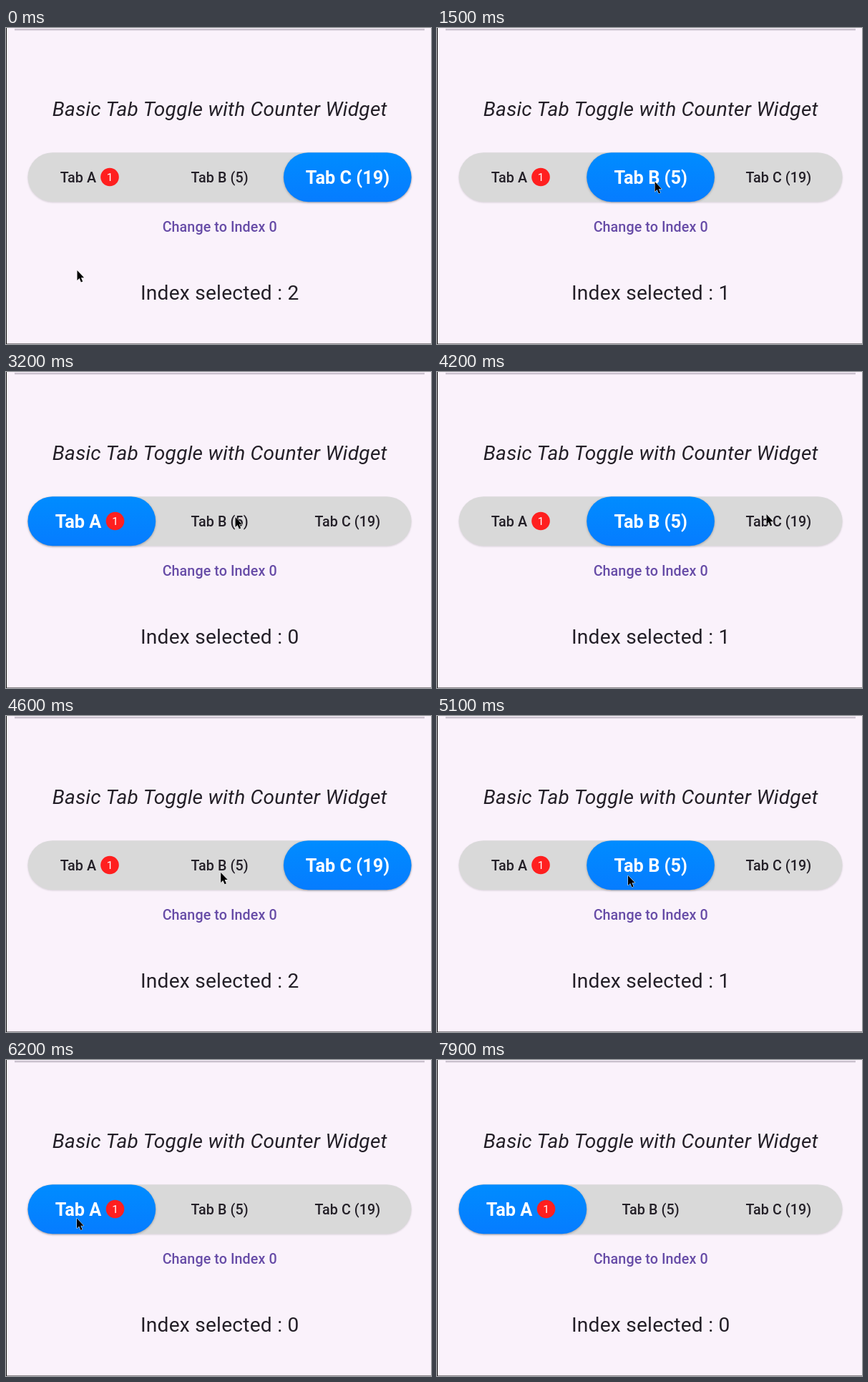
These frames come from a looping animation (594x442 px, 8 s). An HTML page:

```html
<!DOCTYPE html>
<html lang="en">
<head>
<meta charset="utf-8">
<title>Tab toggle</title>
<style>
  html, body { margin: 0; width: 100%; height: 100%; overflow: hidden; background: #faf2fb; }
  svg { display: block; width: 594px; height: 442px; }
  text { font-family: Roboto, sans-serif; fill: #231f27; text-anchor: middle; }
  .title, .index { font-size: 28.1px; letter-spacing: .25px; }
  .title { font-style: italic; }
  .button, .label { font-size: 19.7px; font-weight: 500; letter-spacing: .09px; }
  .button { fill: #674ca7; }
  .label.on { font-size: 25.3px; font-weight: 700; letter-spacing: 0; fill: #fff; }
  .label.start { text-anchor: start; }
  .count { font-size: 15.5px; fill: #fff; }
  #track { filter: drop-shadow(0 1px 1px rgba(0, 0, 0, .14)); }
  #pill { filter: drop-shadow(0 1.5px 1.5px rgba(0, 0, 0, .28)); }
</style>
</head>
<body>
<svg viewBox="0 0 594 442">
  <defs>
    <linearGradient id="blue" x1="0" y1="0" x2="0" y2="1">
      <stop offset="0" stop-color="#008cff"/>
      <stop offset="1" stop-color="#067cff"/>
    </linearGradient>
  </defs>
  <rect width="594" height="442" fill="#faf2fb"/>
  <rect x="12" y="1" width="573" height="2.4" fill="#cac1ce"/>
  <rect y="441" width="594" height="1" fill="#8c878b"/>
  <rect width="1" height="442" fill="#111"/>

  <text class="title" x="298.8" y="122.7">Basic Tab Toggle with Counter Widget</text>
  <rect id="track" x="30.5" y="174.2" width="536.1" height="69" rx="34.5" fill="#d9d9d9"/>
  <rect id="pill" y="174.2" width="178.7" height="69" rx="34.5" fill="url(#blue)"/>
  <text class="label start">Tab A</text>
  <text class="label" x="298.7">Tab B (5)</text>
  <text class="label" x="477.5">Tab C (19)</text>
  <g id="badge">
    <circle r="12.8" fill="#ff1f1f"/>
    <text class="count" y="5.6">1</text>
  </g>
  <text class="button" x="298.7" y="284.6">Change to Index 0</text>
  <text class="index" id="index" x="298.7" y="379.8"></text>
  <path id="cursor" d="M0 0V14L3.1 11L5.4 16.4L7.7 15.4L5.4 10.2H9.6Z"
        fill="#000" stroke="#fff" stroke-width="1" stroke-linejoin="round" paint-order="stroke"/>
</svg>
<script>
  const LOOP = 8000, STEP = 100, SLIDE = 300, CURSOR_END = 7200;
  const TAB_X = 30.5, TAB_W = 178.7;

  // [time, selected tab]
  const picks = [[0, 2], [1100, 1], [2200, 0], [3260, 1], [4260, 2], [4700, 1], [5800, 0]];

  // [time, x, y] where the cursor comes to rest
  const stops = [
    [0, 99.5, 339], [300, 6, 378], [1000, 190, 108], [1500, 304.5, 215],
    [2000, 496, 150], [2500, 100, 212], [2800, 150, 113], [3200, 320.5, 203],
    [4200, 460.5, 199], [5100, 267, 223], [5400, 436, 225], [6200, 99, 221.5],
    [6900, 362, 267]
  ];

  const $ = id => document.getElementById(id);
  const pill = $('pill'), badge = $('badge'), index = $('index'), cursor = $('cursor');
  const labels = [...document.querySelectorAll('.label')];

  const mix = (a, b, p) => a + (b - a) * p;
  const easeInOut = p => p * p * (3 - 2 * p);
  const easeOut = p => 1 - (1 - p) ** 3;
  const place = (el, x, y) => el.setAttribute('transform', `translate(${x} ${y})`);

  // Latest entry begun by time t, and the one next to it
  const lastBegun = (list, t) => list.filter(k => k[0] <= t).length - 1;

  function drawTabs(t) {
    const n = lastBegun(picks, t);
    const [start, tab] = picks[n];
    const from = picks[Math.max(0, n - 1)][1];
    const p = easeInOut(Math.min(1, (t - start) / SLIDE));

    pill.setAttribute('x', TAB_X + TAB_W * mix(from, tab, p));
    labels.forEach((el, i) => {
      el.classList.toggle('on', i === tab);
      el.setAttribute('y', i === tab ? 217.6 : 215.6);
    });
    labels[0].setAttribute('x', tab ? 75.7 : 68.7);
    place(badge, tab ? 145 : 152.5, 208.5);
    index.textContent = 'Index selected : ' + tab;
  }

  function drawCursor(t) {
    const n = lastBegun(stops, t);
    const [t0, x0, y0] = stops[n];
    const [t1, x1, y1] = stops[n + 1] || [LOOP, x0, y0];
    const p = easeOut((t - t0) / (t1 - t0));
    place(cursor, mix(x0, x1, p), mix(y0, y1, p));
    cursor.style.display = t < CURSOR_END ? '' : 'none';
  }

  const origin = performance.now();
  function tick() {
    const now = (performance.now() - origin) % LOOP;
    const t = Math.floor(now / STEP) * STEP;
    drawTabs(t);
    drawCursor(t);
    requestAnimationFrame(tick);
  }
  tick();
</script>
</body>
</html>
```
